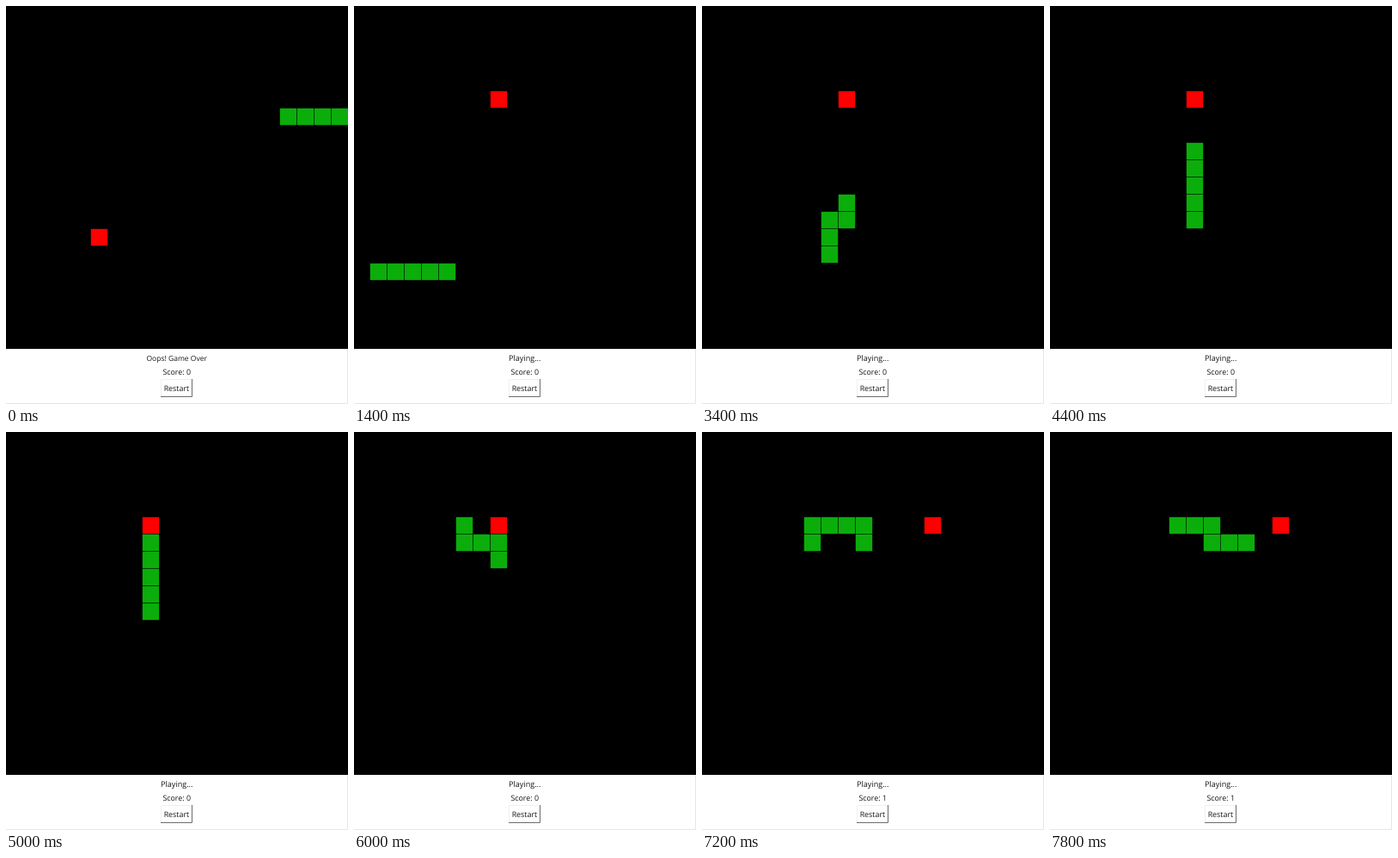
Recreate the animation shown at these times as an HTML page. Size 398 by 462 pixels, loop 8000 ms.

```html
<!DOCTYPE html>
<html lang="en">
<head>
<meta charset="utf-8">
<title>Snake</title>
<style>
  html, body { margin: 0; width: 100%; height: 100%; overflow: hidden; background: #fff; }
  svg { display: block; width: 100%; height: 100%; }
  text {
    font-family: "Open Sans", "Noto Sans", sans-serif;
    font-size: 8.9px;
    fill: #161616;
    text-anchor: middle;
    text-rendering: geometricPrecision;
  }
</style>
</head>
<body>
<svg viewBox="0 0 398 462" preserveAspectRatio="none">
  <rect width="398" height="462" fill="#fff"/>
  <path d="M397.5 398V461.5H0" fill="none" stroke="#e6e6e6"/>
  <rect width="398" height="398" fill="#000"/>
  <g id="snake" fill="#0bad0b"></g>
  <g id="food" fill="#f00"></g>
  <path d="M180.5 453V433.5H216" fill="none" stroke="#f0f0f0"/>
  <path d="M180 453.5H216.5V433" fill="none" stroke="#6c6c6c"/>
  <text id="status" x="198.7" y="411.6"></text>
  <text id="score" x="198.7" y="428.3"></text>
  <text x="198.4" y="446.7">Restart</text>
</svg>
<script>
const LOOP = 8000, SAMPLE = 200;
const RESTART = 1400, FIRST_MOVE = 1545, TICK = 308;
const MOVES = "RRUUURUUUUUULLURRRDRR";
const EAT = 17;
const STEP = { R: [1, 0], L: [-1, 0], U: [0, -1], D: [0, 1] };
const $ = id => document.getElementById(id);

// Every cell the head has visited, tail of the starting snake first.
const trail = [1, 2, 3, 4, 5].map(x => [x, 15]);
for (const m of MOVES) {
  const [x, y] = trail[trail.length - 1];
  trail.push([x + STEP[m][0], y + STEP[m][1]]);
}
const crashed = [16, 17, 18, 19].map(x => [x, 6]);

const cell = ([x, y]) =>
  `<rect x="${20 * x - 1.2}" y="${20 * y - 1.2}" width="19.4" height="19.4"/>`;

function stateAt(ms) {
  const t = Math.floor(ms / SAMPLE) * SAMPLE;
  if (t < RESTART) {
    return { body: crashed, food: [5, 13], status: "Oops! Game Over", size: 8.5, score: 0 };
  }
  const n = Math.max(0, Math.min(MOVES.length, Math.floor((t - FIRST_MOVE) / TICK) + 1));
  const ate = n >= EAT;
  const length = n > EAT ? 6 : 5;
  return {
    body: trail.slice(n + 5 - length, n + 5),
    food: ate ? [13, 5] : [8, 5],
    status: "Playing...",
    size: 9.1,
    score: ate ? 1 : 0
  };
}

function draw(ms) {
  const s = stateAt(ms);
  $("snake").innerHTML = s.body.map(cell).join("");
  $("food").innerHTML = cell(s.food);
  $("status").textContent = s.status;
  $("status").style.fontSize = s.size + "px";
  $("score").textContent = "Score: " + s.score;
}

const start = performance.now();
function frame() {
  draw((performance.now() - start) % LOOP);
  requestAnimationFrame(frame);
}
frame();
</script>
</body>
</html>
```
